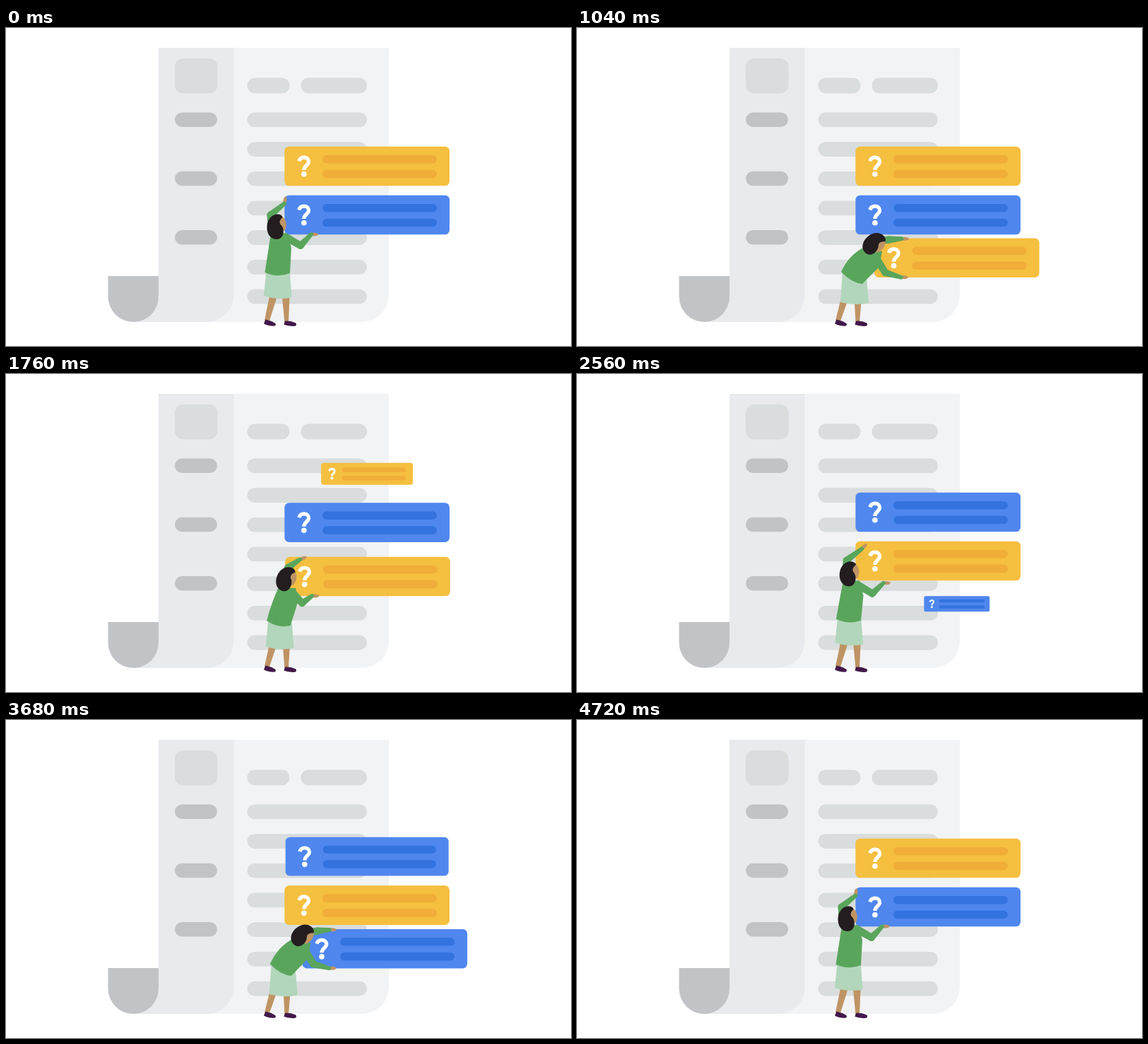
These frames come from a looping animation (800 by 450 pixels, 4800 ms). An HTML page with a canvas:

```html
<!DOCTYPE html>
<html lang="en">
<head>
<meta charset="utf-8">
<title>Sorting questions</title>
<style>
html, body { margin: 0; width: 100%; height: 100%; overflow: hidden; background: #fff; }
canvas { display: block; width: 800px; height: 450px; }
</style>
</head>
<body>
<canvas id="stage"></canvas>
<script>
const canvas = document.getElementById('stage');
const ctx = canvas.getContext('2d');
const dpr = window.devicePixelRatio || 1;
canvas.width = 800 * dpr;
canvas.height = 450 * dpr;

const LOOP = 4800, TURN = 2366, STEP = 80, RISE = 1230;
const YELLOW = { face: '#f5bf3f', bar: '#f0ad38' };
const BLUE = { face: '#4f87ef', bar: '#3473de' };
const GREEN = '#5aa55c', SKIN = '#bf9464', HAIR = '#231d20', SHOE = '#42184a';
const PILL = '#d9dddd', DARK = '#c2c3c6';
const TOP = { x: 511.2, y: 195.5 }, HELD = { x: 511.2, y: 264.5 }, FRESH = { x: 537.8, y: 325.2 };
const GAP = HELD.y - TOP.y;

// Key points of the body: upright x, y, then bent x, y.
const BODY = {
  nape: [375, 291, 405, 311],
  throat: [398, 290, 432, 316],
  chest: [404, 311, 428, 338],
  hemBack: [366.5, 346, 374, 345],
  hemFront: [402, 347, 404, 362],
  skirtBack: [365, 379, 373, 388],
  skirtFront: [404.5, 381.5, 413, 389],
  farShoulder: [377, 290, 426, 301],
  nearShoulder: [398, 297, 424, 327]
};

const clamp = x => Math.min(1, Math.max(0, x));
const mix = (a, b, k) => a + (b - a) * k;
const mid = (p, q) => ({ x: (p.x + q.x) / 2, y: (p.y + q.y) / 2 });
const between = (p, q, kx, ky = kx) => ({ x: mix(p.x, q.x, kx), y: mix(p.y, q.y, ky) });
const smooth = (t, start, span) => {
  const x = clamp((t - start) / span);
  return x * x * (3 - 2 * x);
};

function fill(color, path) {
  ctx.fillStyle = color;
  ctx.fill(path);
}
const shape = (color, d) => fill(color, new Path2D(d));

function box(color, x, y, w, h, r) {
  const p = new Path2D();
  p.roundRect(x, y, w, h, r);
  fill(color, p);
}
const pill = (color, x, y, w, h) => box(color, x, y, w, h, h / 2);

function oval(color, x, y, rx, ry, angle = 0) {
  const p = new Path2D();
  p.ellipse(x, y, rx, ry, angle, 0, 7);
  fill(color, p);
}

function drawPage() {
  box('#f2f3f5', 216, 28, 326, 388, [0, 0, 38, 0]);
  box('#e8eaed', 216, 28, 106.5, 388, [0, 0, 38, 0]);
  box('#e8eaed', 180, 380, 40, 36, 0);
  shape(DARK, 'M144.5 351H216V380A35.75 36 0 0 1 144.5 380Z');
  box(PILL, 239, 43, 60.5, 49.5, 12);
  for (let i = 0; i < 3; i++) pill(DARK, 239, 119.5 + i * 83.3, 60, 20.5);
  pill(PILL, 341.5, 70.5, 60, 22);
  pill(PILL, 417.5, 70.5, 93.5, 22);
  for (let i = 0; i < 7; i++) pill(PILL, 341.5, 119.5 + i * 41.7, 169.5, 20.7);
}

const hook = new Path2D('M-96.3-7C-95.3-10.7-92.8-12.3-89.3-12.3C-85.4-12.3-82.6-10-82.6-6.5C-82.6-1-89.3-1-89.3 5.5');

function drawCard(tint, x, y, scale = 1) {
  if (scale <= 0.01) return;
  ctx.save();
  ctx.translate(x, y);
  ctx.scale(scale, scale);
  box(tint.face, -116.8, -27.8, 233.6, 55.6, 6.5);
  pill(tint.bar, -63.2, -15.6, 162, 11.5);
  pill(tint.bar, -63.2, 5.2, 162, 11.5);
  ctx.strokeStyle = '#fff';
  ctx.lineWidth = 5.2;
  ctx.stroke(hook);
  oval('#fff', -89.3, 11.2, 3.8, 3.8);
  ctx.restore();
}

function limb(p, r1, q, r2) {
  const a = Math.atan2(q.y - p.y, q.x - p.x) + Math.PI / 2;
  const path = new Path2D();
  path.arc(p.x, p.y, r1, a, a + Math.PI);
  path.arc(q.x, q.y, r2, a + Math.PI, a + 2 * Math.PI);
  path.closePath();
  fill(GREEN, path);
}

// The elbow bows out sideways from the line between shoulder and wrist.
function drawArm(shoulder, wrist, bow, tilt) {
  const dx = wrist.x - shoulder.x, dy = wrist.y - shoulder.y, len = Math.hypot(dx, dy);
  const elbow = mid(shoulder, wrist);
  elbow.x -= dy / len * bow;
  elbow.y += dx / len * bow;
  oval(SKIN, wrist.x + 4.5 * Math.cos(tilt), wrist.y + 4.5 * Math.sin(tilt), 5.6, 2.5, tilt);
  limb(shoulder, 5.5, elbow, 5);
  limb(elbow, 5, wrist, 2.9);
}

function drawHead(u) {
  ctx.save();
  ctx.translate(mix(382, 420, u), mix(281, 304.5, u));
  ctx.rotate(0.8 * u ** 0.8);
  shape(SKIN, 'M4-14L10-13.5C13-11 14-8 15-3L14 3C13 6 10 7 6 7Z');
  shape(HAIR, 'M2-17.5C6-17.5 10-15.5 9.5-13C5-9 4-5 8.5-1C13 6 11 18 1 18C-8 18-13 9-12.5 0C-12-10-6-17 2-17.5Z');
  ctx.restore();
}

// u runs from upright (0) to bent (1); grip is the card centre the hands aim at.
function drawPerson(u, grip) {
  const dip = 4 * Math.sin(Math.PI * u), hip = 2 * u;
  const at = {};
  for (const [name, [x0, y0, x1, y1]] of Object.entries(BODY)) {
    at[name] = { x: mix(x0, x1, u), y: mix(y0, y1, u) + dip };
  }
  at.farShoulder.y -= dip;
  const xy = (p, dx = 0, dy = 0) => `${p.x + dx} ${p.y + dy}`;

  shape(SKIN, `M${375 + hip} 370H${387 + hip}L372.5 416L366 414Z`);
  shape(SKIN, `M${390 + hip} 370H${402 + hip}L400 417H394.5Z`);
  shape(SHOE, 'M367.5 412.5Q375 414 381.5 418Q383 421.5 379 421.8Q370 421.5 365 418.3Z');
  shape(SHOE, 'M395 414.7Q403 414 410 417.3Q412.5 420 409.5 421.8Q400 422.5 393.5 419.8Z');

  const { nape, throat, chest, hemBack, hemFront, skirtBack, skirtFront } = at;
  shape('#b2d6bb', `M${xy(hemBack, 2, -2)}L${xy(hemFront, 6 * u, -10 * u)}L${xy(skirtFront)}` +
    `Q${xy(mid(skirtFront, skirtBack), 0, 5)} ${xy(skirtBack)}Z`);

  const farWrist = { x: grip.x - mix(117, 78, u ** 0.6), y: grip.y - mix(16, 27, u ** 0.3) };
  const nearWrist = { x: grip.x - 79, y: grip.y + 27.5 };
  drawArm(at.farShoulder, farWrist, -12 * (1 - u), -1.4 * (1 - u ** 0.3));
  shape(GREEN, `M${xy(nape)}Q${xy(mid(nape, hemBack), -5 * u, -6 * u)} ${xy(hemBack)}` +
    `Q${xy(mid(hemBack, hemFront), 0, 7.5)} ${xy(hemFront)}L${xy(chest)}L${xy(throat)}Z`);
  drawArm(at.nearShoulder, nearWrist, mix(13.5, 8, u), 0);
  drawHead(u);
}

function draw(time) {
  const second = time >= TURN;
  const t = second ? time - TURN : time;
  const [first, other] = second ? [BLUE, YELLOW] : [YELLOW, BLUE];

  const shift = GAP * smooth(t, RISE, 754);
  const lift = smooth(t, RISE, 895);
  const shrink = 1 - (Math.max(0, t - RISE) / 796) ** 2;
  const grow = 1 - (1 - clamp((t - 25) / 755)) ** 2;
  const card = between(FRESH, HELD, smooth(t, RISE, 595), lift);

  const rising = t > RISE;
  const bend = rising ? 1 - lift : smooth(t, 65, 855);
  const grip = rising ? card : between(HELD, FRESH, bend);

  ctx.setTransform(dpr, 0, 0, dpr, 0, 0);
  ctx.fillStyle = '#fff';
  ctx.fillRect(0, 0, 800, 450);
  drawPage();
  drawCard(first, TOP.x, TOP.y - shift, shrink);
  drawCard(other, HELD.x, HELD.y - shift);
  drawCard(first, card.x, card.y, grow);
  drawPerson(bend, grip);
}

function tick() {
  const t = performance.now() % LOOP;
  draw(Math.floor(t / STEP) * STEP);
  requestAnimationFrame(tick);
}
tick();
</script>
</body>
</html>
```
